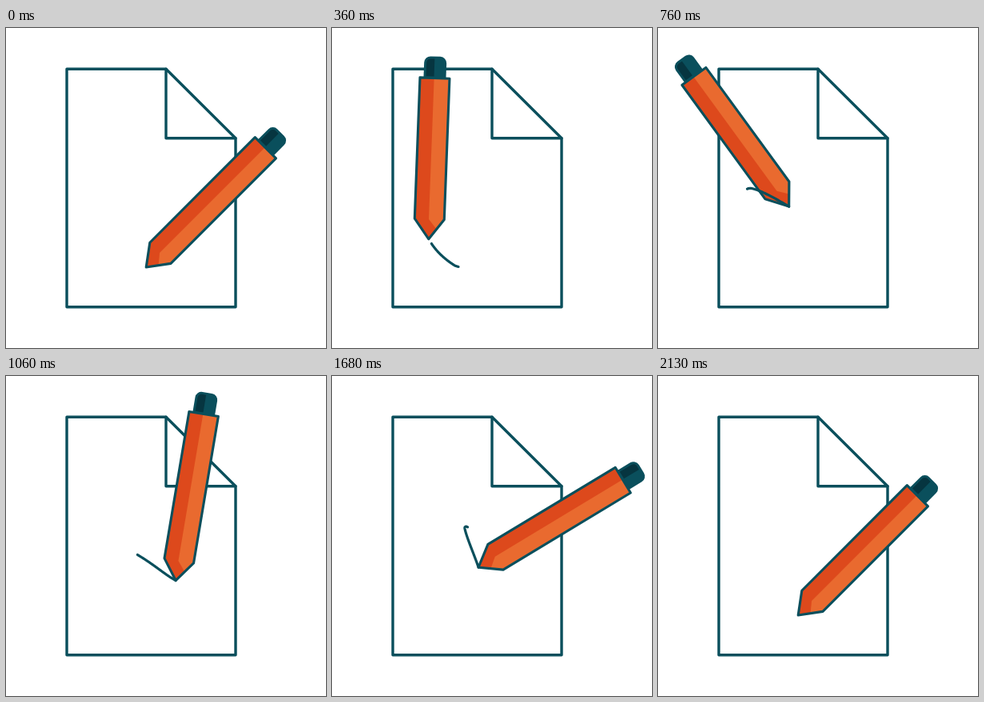
Recreate the animation shown at these times as an HTML page with a canvas. Size 400 by 400 pixels, loop 2160 ms.

```html
<!DOCTYPE html>
<html lang="en">
<head>
<meta charset="utf-8">
<title>Writing pen</title>
<style>
  html, body { margin: 0; width: 100%; height: 100%; overflow: hidden; background: #fff; }
  canvas { display: block; }
</style>
</head>
<body>
<canvas width="400" height="400"></canvas>
<script>
const ctx = document.querySelector('canvas').getContext('2d');
const LOOP = 2160, REST = 2130, INK = 57;
const TEAL = '#0a4f5c', SHADE = '#063540', RED = '#dd491c', ORANGE = '#e96a2f';

// Turning points of the pen: time, tip x, tip y, angle in degrees
const poses = [
  [0, 175.2, 299, 45],
  [160, 152, 296, 32],
  [360, 121, 264, 2.3],
  [530, 105, 211, -20],
  [600, 117, 200.5, -28],
  [760, 163.5, 223, -36.2],
  [1060, 212, 255.5, 9.4],
  [1120, 213, 250, 18],
  [1380, 172.3, 191.3, 55.7],
  [1450, 166, 191, 60],
  [1680, 183, 239, 58.9],
  [1850, 192, 270, 53],
  [REST, 175.2, 299, 45]
];

// Smooth curve through the poses, at rest at both ends.
function poseAt(t) {
  t = Math.max(0, Math.min(t, REST - 0.01));
  const i = poses.findIndex(p => p[0] > t) - 1;
  const a = poses[i], b = poses[i + 1];
  const d = b[0] - a[0], u = (t - a[0]) / d, v = 1 - u;
  const slope = (j, k) => {
    const p = poses[j - 1], n = poses[j + 1];
    return p && n ? (n[k] - p[k]) / (n[0] - p[0]) : 0;
  };
  return [1, 2, 3].map(k =>
    a[k] * v * v * (1 + 2 * u) + b[k] * u * u * (3 - 2 * u)
    + d * u * v * (v * slope(i, k) - u * slope(i + 1, k)));
}

// The pen tilts away from the viewer on the left and looks shorter there.
const bodyLength = t => 186 - 29 * Math.exp(-(((t - 560) / 190) ** 2));

function poly(points, close) {
  ctx.beginPath();
  points.forEach(([x, y]) => ctx.lineTo(x, y));
  if (close) ctx.closePath();
}

function box(x, y, w, h, radii, color) {
  ctx.beginPath();
  ctx.roundRect(x, y, w, h, radii);
  ctx.fillStyle = color;
  ctx.fill();
}

function drawPage() {
  ctx.lineWidth = 3.4;
  poly([[76, 51.2], [200, 51.2], [287, 137.8], [287, 348.8], [76, 348.8]], true);
  ctx.stroke();
  poly([[200, 51.2], [200, 137.8], [287, 137.8]]);
  ctx.stroke();
}

function drawPen(t) {
  const [x, y, angle] = poseAt(t), back = -25 - bodyLength(t);
  ctx.save();
  ctx.translate(x, y);
  ctx.rotate(angle * Math.PI / 180);
  box(-14, back - 27, 28, 28, [8, 8, 0, 0], TEAL);
  box(-11, back - 24, 10, 22, [5, 0, 0, 0], SHADE);
  const outline = [[0, 0], [-18.5, -25], [-18.5, back], [18.5, back], [18.5, -25]];
  poly(outline, true);
  ctx.fillStyle = RED;
  ctx.fill();
  poly([[-0.8, back], [-0.8, -24.7], [9.2, -12.5], [18.5, -25], [18.5, back]], true);
  ctx.fillStyle = ORANGE;
  ctx.fill();
  poly(outline, true);
  ctx.lineWidth = 3.1;
  ctx.stroke();
  ctx.restore();
}

// Ink of nearly fixed length follows the tip; it grows in and shrinks away.
function drawInk(t) {
  let left = INK * Math.min(1, t / 460, (REST - t) / 400);
  let s = t - Math.max(0, 50 - t / 15);
  if (left < 1 || s <= 0) return;
  const points = [poseAt(s)];
  while (left > 0 && s > 0) {
    const next = poseAt(s -= 3), last = points.at(-1);
    left -= Math.hypot(next[0] - last[0], next[1] - last[1]);
    points.push(next);
  }
  poly(points);
  ctx.lineWidth = 3.2;
  ctx.stroke();
}

function frame() {
  const t = performance.now() % LOOP;
  ctx.fillStyle = '#fff';
  ctx.fillRect(0, 0, 400, 400);
  ctx.strokeStyle = TEAL;
  ctx.lineCap = ctx.lineJoin = 'round';
  drawPage();
  drawPen(t);
  drawInk(t);
  requestAnimationFrame(frame);
}
frame();
</script>
</body>
</html>
```
